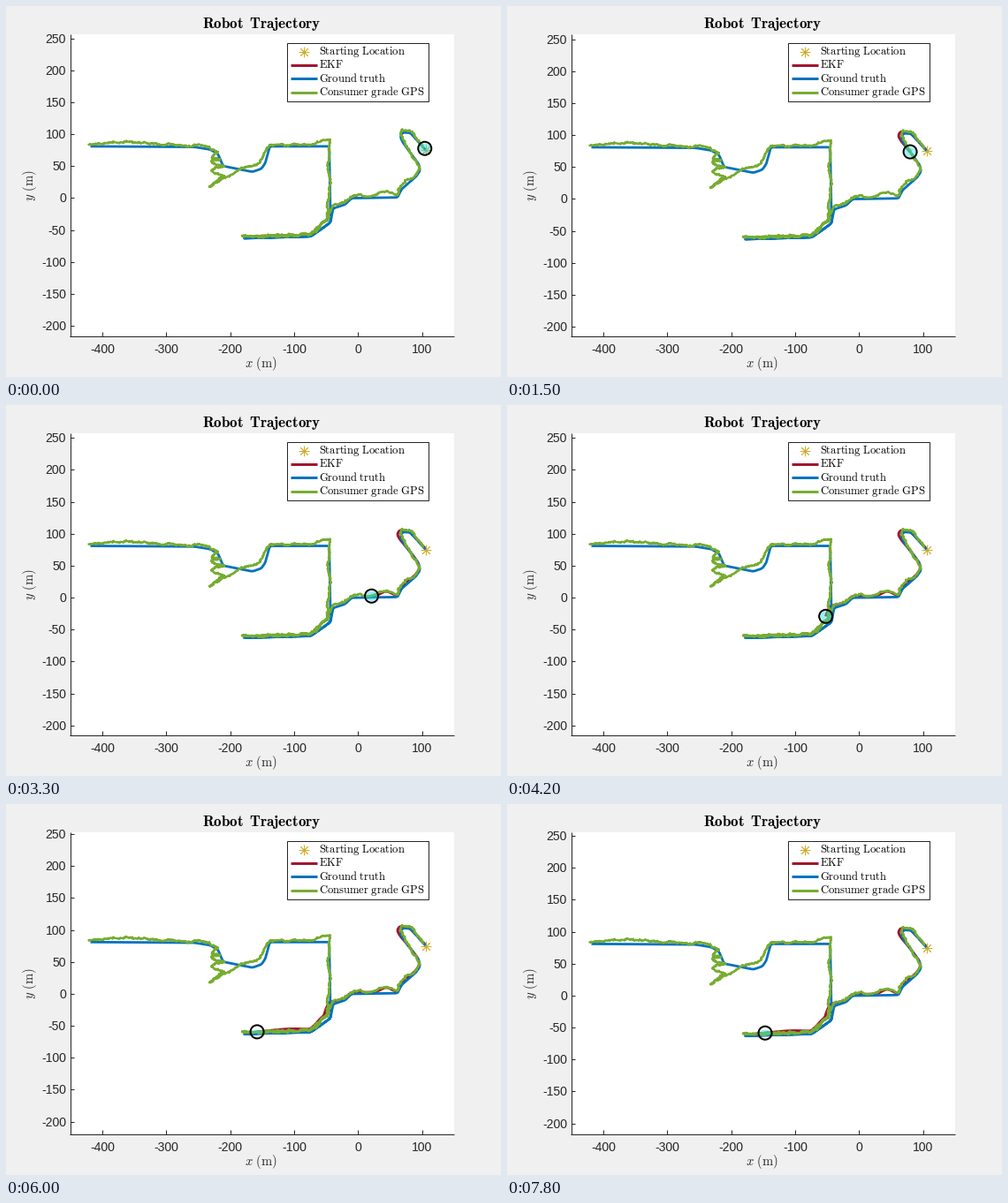
Recreate the animation shown at these times as a matplotlib script. Size 560x420 px, loop 8000 ms.

```python
import numpy as np
import matplotlib.pyplot as plt
from matplotlib.animation import FuncAnimation
from matplotlib.patches import Circle, Ellipse, Rectangle
from matplotlib.transforms import Affine2D

W, H, DPI = 560, 420, 80
PX = 72 / DPI                          # points per pixel
INK, RED, BLUE, GREEN, GOLD = "#262626", "#A2142F", "#0072BD", "#77AC30", "#CFAD2A"
LEFT, RIGHT, TOP, BOTTOM = 72.5, 506.5, 32, 373.5
SCALE, ZERO_Y = 0.7233, 217.4          # pixels per metre, resting height of y = 0
SPACING = 0.5                          # metres between path samples
STEPS = np.arange(27)

plt.rcParams["font.family"] = "Liberation Sans"
plt.rcParams["mathtext.fontset"] = "cm"

# Corners of the drive in metres: out to the turning point, then home
OUT = [(106, 75), (82, 102), (70, 103), (66, 96), (70, 87), (95, 53), (97, 43),
       (91, 34), (68, 14), (62, 1), (-10, 0), (-20, -10), (-39, -16), (-43, -38),
       (-58, -49), (-74, -60), (-180, -63)]
BACK = OUT[-2:-5:-1] + [(-45, 81), (-138, 81), (-145, 55)]
HOME = [(-231, 76), (-256, 80), (-420, 81)]
BEND = [(-151, 46), (-165, 41), (-211, 50), (-219, 69)]
# Satellite reflections make the receiver jump from side to side
ZIGZAG = [(-154, 52), (-175, 46)] + [
    (-230 + i % 2 * (25 - 2 * i), 16 + 60 * (i / 9) ** .6) for i in range(9)]

# Local errors: centre, shift, reach
GPS_ERRORS = [((45, 1), (0, 7), 8), ((-46, -40), (-4, 1), 20),
              ((-46, 81), (2, 5), 12), ((-375, 81), (0, 4), 40)]
EKF_ERRORS = [((66, 100), (-4, 1), 14), ((45, 1), (0, 7), 8),
              ((-45, -35), (-9, 2), 18), ((-105, -62), (0, 4), 30)]
# Where the filter puts the robot at a few steps
CHECKPOINTS = {0: (106, 75), 3: (63, 100), 8: (92, 33), 14: (-53, -29),
               17: (-108, -54), 20: (-158, -59), 22.4: (-182, -60), 26: (-147, -58)}


def smooth(path, window):
    padded = np.pad(path, ((window // 2, window // 2), (0, 0)), mode="edge")
    kernel = np.ones(window) / window
    return np.stack([np.convolve(c, kernel, "valid") for c in padded.T], axis=1)


def trace(corners, window=15):
    """Evenly sampled polyline with rounded corners."""
    corners = np.array(corners, float)
    dist = np.r_[0, np.cumsum(np.hypot(*np.diff(corners, axis=0).T))]
    s = np.arange(0, dist[-1], SPACING)
    return smooth(np.stack([np.interp(s, dist, c) for c in corners.T], axis=1), window)


def disturb(path, bias, errors):
    moved = path + bias
    for centre, shift, reach in errors:
        away = np.sum((path - centre) ** 2, axis=1)
        moved += np.exp(-away / (2 * reach ** 2))[:, None] * shift
    return moved


def noise(shape, size, window):
    return smooth(rng.normal(0, size * window ** .5, shape), window)


rng = np.random.default_rng(4)
truth = trace(OUT + BACK + BEND + HOME)
gps = disturb(trace(OUT + BACK[:-1] + ZIGZAG + HOME, 5), (-1, 3), GPS_ERRORS)
gps += noise(gps.shape, 1, 25) + noise(gps.shape, .5, 3)
ekf = disturb(trace(OUT), (-1, 2), EKF_ERRORS)

passed = [np.hypot(*(ekf - point).T).argmin() for point in CHECKPOINTS.values()]
robot_at = np.interp(STEPS, list(CHECKPOINTS), passed).astype(int)
trail_end = np.maximum.accumulate(robot_at)


def axes_drift(step):
    """Vertical shift in pixels while the axis limits adapt to the robot."""
    loop = 2.2 * np.exp(-((step - 3) / 1.5) ** 2)
    turn = -7.5 * np.exp(-((step - 22.3) / 2.2) ** 2)
    return loop + turn + 0.7 * (4 < step < 15)


fig = plt.figure(figsize=(W / DPI, H / DPI), dpi=DPI, facecolor="#F0F0F0")
ax = fig.add_axes([0, 0, 1, 1])
ax.set(xlim=(0, W), ylim=(H, 0))
ax.axis("off")
stage = ax.transData
drift = Affine2D()
metres = (Affine2D().translate(450, 0).scale(SCALE, -SCALE)
          .translate(LEFT + .3, ZERO_Y) + drift + stage)


def line(xs, ys, color, width, z=2, transform=stage):
    return ax.plot(xs, ys, color=color, lw=width * PX, zorder=z, transform=transform,
                   solid_capstyle="butt", solid_joinstyle="round")[0]


def label(x, y, text, size, color=INK, transform=stage, **kw):
    ax.text(x, y, text, fontsize=size * PX, color=color, zorder=9,
            transform=transform, va="baseline", **kw)


def star(x, y, z, transform=stage):
    ax.plot([x], [y], marker=(8, 2, 0), ms=11.5 * PX, mec=GOLD, mew=.9 * PX,
            zorder=z, transform=transform)


def draw_axes():
    ax.add_patch(Rectangle((LEFT, TOP), RIGHT - LEFT, BOTTOM - TOP, fc="white", ec="none"))
    line([LEFT, LEFT], [TOP, BOTTOM], INK, 1)
    line([LEFT - .5, RIGHT], [BOTTOM, BOTTOM], INK, 1)
    for value in range(-400, 101, 100):
        x = LEFT + .3 + (value + 450) * SCALE
        line([x, x], [BOTTOM - 4.5, BOTTOM], INK, 1)
        label(x, 393.3, str(value), 14, ha="center")
    for value in range(-200, 251, 50):
        y = ZERO_Y - value * SCALE
        line([LEFT, LEFT + 4.5], [y, y], INK, 1, transform=drift + stage)
        label(68, y + 5, str(value), 14, transform=drift + stage, ha="right")
    label(289.5, 25, r"$\mathbf{Robot\ \,Trajectory}$", 17, "black", ha="center")
    label(288.7, 409.3, r"$x\ \mathrm{(m)}$", 14.6, ha="center")
    label(31.3, 203, r"$y\ \mathrm{(m)}$", 14.6, ha="center", rotation=90,
          rotation_mode="anchor")


def draw_legend():
    ax.add_patch(Rectangle((317.5, 41.5), 160.5, 66, fc="white", ec=INK, lw=PX, zorder=7))
    star(337, 51.5, 8)
    rows = [("Starting Location", None), ("EKF", RED),
            ("Ground truth", BLUE), ("Consumer grade GPS", GREEN)]
    for i, (text, color) in enumerate(rows):
        y = 51 + 15.5 * i
        if color:
            line([322, 352], [y, y], color, 3, z=8)
        label(354.4, y + 3.8, r"$\mathrm{%s}$" % text.replace(" ", r"\ "), 12.6, "black")


draw_axes()
draw_legend()
star(106, 75, 2, metres)
trail = line([], [], RED, 3, 3, metres)
line(*truth.T, BLUE, 2.8, 4, metres)
line(*gps.T, GREEN, 2.4, 5, metres)
spread = ax.add_patch(Ellipse((0, 0), 18, 14, fc="#30DDE0", alpha=.45, ec="none",
                              zorder=6, transform=metres))
robot = ax.add_patch(Circle((0, 0), 7.5 / SCALE, fc="none", ec="black", lw=2 * PX,
                            zorder=6.5, transform=metres))


def update(i):
    step = min(i // 3, STEPS[-1])
    drift.clear().translate(0, axes_drift(step))
    trail.set_data(*ekf[:trail_end[step] + 1].T)
    robot.center = spread.center = tuple(ekf[robot_at[step]])
    spread.height = np.interp(step, [14, 20, 26], [16, 6, 10])
    return trail, robot, spread


anim = FuncAnimation(fig, update, frames=80, interval=100, repeat=True,
                     repeat_delay=0, blit=False)
plt.show()
```
